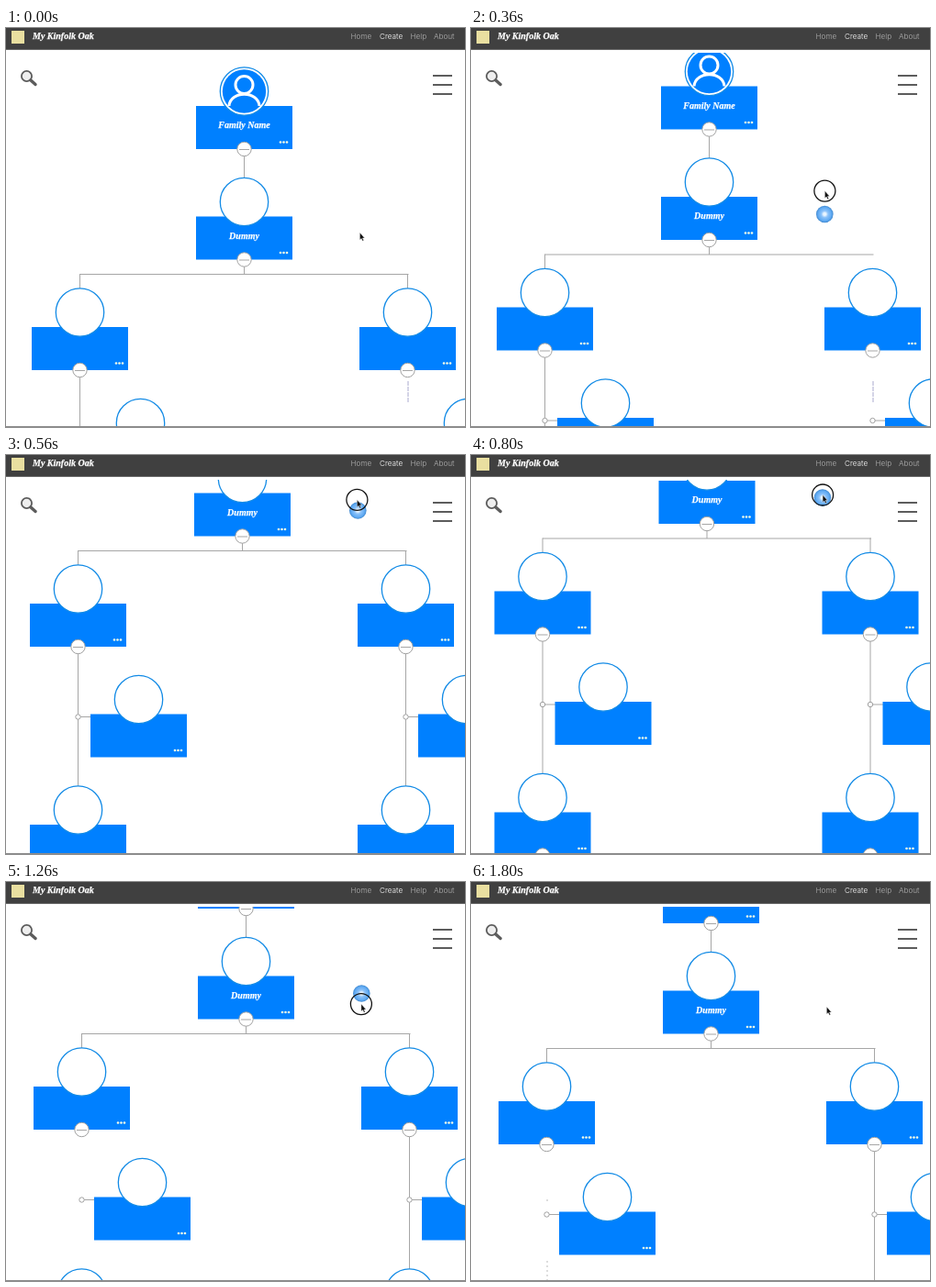
These frames come from a looping animation (500x435 px, 1.82 s). An HTML page:

```html
<!DOCTYPE html>
<html lang="en">
<head>
<meta charset="utf-8">
<title>Tree editor</title>
<style>
  html, body { margin: 0; width: 100%; height: 100%; overflow: hidden; background: #fff; }
  svg { display: block; }
  .script { font: italic bold 10px "Liberation Serif", serif; fill: #fff; stroke: #fff; stroke-width: .25; }
  .nav { font: 300 8.2px Inter, sans-serif; fill: #b0b0b0; }
  .line { fill: none; stroke: #a6a6a6; }
  .ring { fill: #fff; stroke: #138be6; stroke-width: 1.3; }
  .knob { fill: #fff; stroke: #a0a0a0; }
</style>
</head>
<body>
<svg id="stage" width="500" height="435" viewBox="0 0 500 435">
  <defs>
    <clipPath id="view"><path d="M0 27H500V434H0z"/></clipPath>
    <radialGradient id="glow">
      <stop offset=".15" stop-color="#eaf5ff"/>
      <stop offset=".4" stop-color="#8cc2fa"/>
      <stop offset=".8" stop-color="#5ea9f2"/>
      <stop offset="1" stop-color="#3f86cc"/>
    </radialGradient>
  </defs>
  <rect width="500" height="435" fill="#fff"/>
  <g clip-path="url(#view)">
    <g id="tree"></g>
    <path id="residueRight" d="M438 385V409" stroke="#a9a9cf" stroke-dasharray="5 1"/>
    <path id="residueLeft" d="M83 346v2M83 413V434" stroke="#bbb" stroke-dasharray="2 3"/>
  </g>
  <path d="M0 434.5H500" stroke="#8c8c8c"/>
  <rect width="500" height="23.5" fill="#404040"/>
  <path d="M0 23.5H500" stroke="#6a6a6a"/>
  <rect x="6" y="3" width="14" height="14" fill="#e9dfa0"/>
  <text class="script" x="29" y="12">My Kinfolk Oak</text>
  <g class="nav">
    <text x="375.5" y="12">Home</text>
    <text x="407" y="12" fill="#fff" style="fill:#fff">Create</text>
    <text x="440.5" y="12">Help</text>
    <text x="466" y="12">About</text>
  </g>
  <g fill="none" stroke="#5c5c5c">
    <circle cx="22.5" cy="52.5" r="5.6" stroke-width="1.8" fill="#eee"/>
    <path d="M27 57L32 61.5" stroke-width="3.4" stroke-linecap="round"/>
    <path d="M465 52H486M465 62H486M465 72H486" stroke-width="1.8"/>
  </g>
  <circle id="dot" r="9.3" fill="url(#glow)"/>
  <g id="cursor">
    <circle id="press" r="11.5" fill="none" stroke="#111" stroke-width="1.3"/>
    <path d="M0 0V8L1.8 6.5L3 9.2L4.3 8.6L3.1 6H5.3z" fill="#111" stroke="#fff" stroke-width=".4"/>
  </g>
</svg>
<script>
const LOOP = 1820;
const $ = id => document.getElementById(id);

// Card with portrait circle; (x, y) is the middle of the card's top edge.
function card(x, y, { label = "", knob = true, avatar = false } = {}) {
  const bottom = y + 47;
  const dots = [-13, -9.5, -6].map(d =>
    `<circle cx="${x + 52.5 + d}" cy="${bottom - 7.5}" r="1.3" fill="#f4fbe8"/>`).join("");
  const person = `<circle cx="${x}" cy="${y - 16}" r="23.7" fill="#0080ff"/>
    <g fill="none" stroke="#fff" stroke-width="3"><circle cx="${x}" cy="${y - 23}" r="9.5"/>
    <path d="M${x - 16.5} ${y}c1-17 32-17 33 0"/></g>`;
  return `<rect x="${x - 52.5}" y="${y}" width="105" height="47" fill="#0080ff"/>
    <circle class="ring" cx="${x}" cy="${y - 16}" r="26.2"/>
    ${avatar ? person : ""}${dots}
    <text class="script" x="${x}" y="${y + 24}" text-anchor="middle">${label}</text>
    ${knob ? `<circle class="knob" cx="${x}" cy="${bottom}" r="7.7"/>
    <path class="line" d="M${x - 5.5} ${bottom + .5}h11"/>` : ""}`;
}

function branch(x, side) {
  return `<path class="line" id="stub${side}" d="M${x} 268V285"/>
    <path class="line" id="stem${side}" d="M${x} 373V526"/>
    <path class="line" d="M${x} 449.5h14"/>
    <circle class="knob" cx="${x}" cy="449.5" r="2.7"/>
    ${card(x, 326)}${card(x + 66, 446.5, { knob: false })}${card(x, 567)}`;
}

$("tree").innerHTML =
  `<path class="line" d="M259.5 132V164M259.5 252V268.5M80.5 268.5H438.5"/>` +
  card(259.5, 85, { label: "Family Name", avatar: true }) +
  card(259.5, 205.5, { label: "Dummy" }) +
  branch(80.5, "Left") + branch(437.5, "Right");

// Keys: [time, dx, dy]
const pointerKeys = [[0, 0, 0], [200, 0, 0], [360, 0, -45], [480, -2.5, -136.5], [560, -3, -174],
  [640, -3, -180], [960, -1, -178], [1080, 0, -148], [1260, 1.5, -90], [1400, 2, -87], [LOOP, 2, -87]];
const treeKeys = [[0, 0, 0], [260, 0, 0], [360, 0, -21], [480, -1.5, -107], [560, -2, -163.5],
  [640, -2.5, -177], [980, -2, -178], [1080, -1.3, -174], [1260, 2, -103], [1380, 2, -88],
  [1500, 2, -87], [LOOP, 2, -87]];

// Monotone cubic through the keys
function sample(keys, t, axis) {
  const slope = i => keys[i + 1]
    ? (keys[i + 1][axis] - keys[i][axis]) / (keys[i + 1][0] - keys[i][0]) : 0;
  const tangent = i => {
    if (i === 0) return 0;
    const a = slope(i - 1), b = slope(i);
    return a * b > 0 ? 2 * a * b / (a + b) : 0;
  };
  let i = 0;
  while (i < keys.length - 2 && t >= keys[i + 1][0]) i++;
  const h = keys[i + 1][0] - keys[i][0], u = (t - keys[i][0]) / h, v = 1 - u;
  return keys[i][axis] * (1 + 2 * u) * v * v + keys[i + 1][axis] * u * u * (3 - 2 * u)
    + h * u * v * (tangent(i) * v - tangent(i + 1) * u);
}

const move = (id, x, y) => $(id).setAttribute("transform", `translate(${x} ${y})`);
const show = (id, on) => $(id).setAttribute("visibility", on ? "visible" : "hidden");

function draw(now) {
  const t = now % LOOP;
  const x = sample(treeKeys, t, 1), y = sample(treeKeys, t, 2);
  const pressed = t >= 200 && t < 1650;
  move("tree", Math.round(x * 2) / 2, Math.round(y * 2) / 2);
  move("dot", 385.3 + x, 224.3 + y);
  move("cursor", 385.4 + sample(pointerKeys, t, 1), 223 + sample(pointerKeys, t, 2));
  show("dot", pressed);
  show("press", pressed);
  // Connector lines drop out during redraws
  show("stemRight", t >= 420);
  show("residueRight", t < 420);
  show("stubRight", t < 260 || t >= 420);
  show("stemLeft", t < 1180);
  show("residueLeft", t >= 1400);
  requestAnimationFrame(draw);
}
requestAnimationFrame(draw);
</script>
</body>
</html>
```
